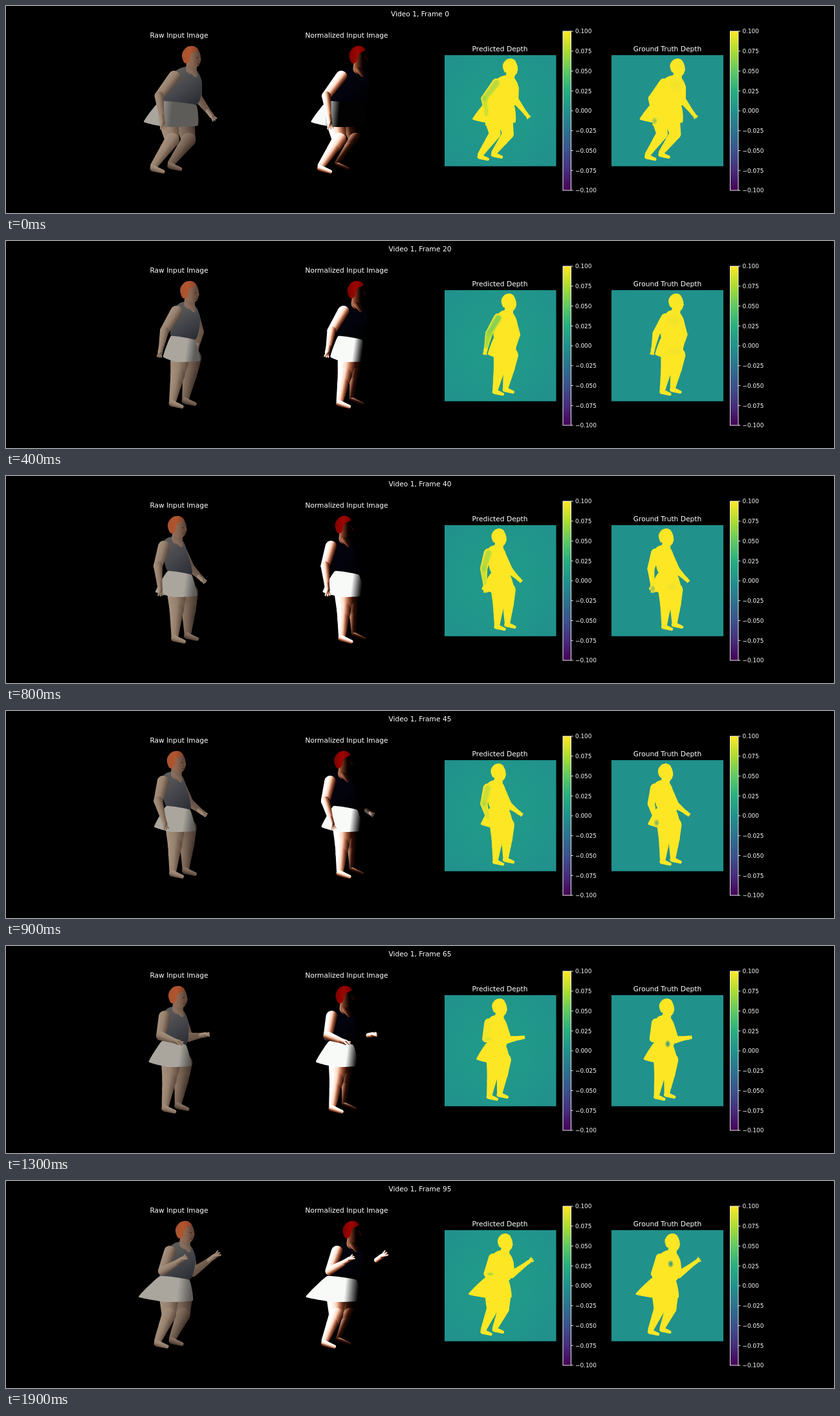
These frames come from a looping animation (1280x320 px, 2 s). An HTML page with a canvas:

```html
<!DOCTYPE html>
<html lang="en">
<head>
<meta charset="utf-8">
<title>Depth prediction</title>
<style>
html, body { margin: 0; height: 100%; overflow: hidden; background: #000; }
canvas { display: block; }
</style>
</head>
<body>
<canvas id="stage" width="1280" height="320"></canvas>
<script>
const ctx = document.getElementById('stage').getContext('2d');
const clamp = u => Math.min(1, Math.max(0, u));
const mix = (a, b, u) => [a[0] + (b[0] - a[0]) * u, a[1] + (b[1] - a[1]) * u];
const bump = (x, center, width) => Math.exp(-(((x - center) / width) ** 2));

// Key poses: step, head x, hip x, back hem x, near fingertip x y, far fingertip x y.
// The rest of the body follows from these in skeleton().
const poses = [
  [0, 286, 252, 213, 243, 190, 323, 176],
  [2, 287, 264, 241, 237, 183, 302, 178],
  [6, 277, 271, 239, 238, 178, 290, 168],
  [8, 264, 264, 231, 239, 185, 308, 164],
  [11, 264, 258, 226, 267, 172, 309, 153],
  [16, 268, 252, 212, 276, 120, 323, 112],
  [19, 276, 252, 205, 279, 117, 330, 111]];

// Cubic Hermite interpolation through the key poses.
function poseAt(step) {
  let i = 0;
  while (i < poses.length - 2 && step >= poses[i + 1][0]) i++;
  const from = poses[i], to = poses[i + 1], span = to[0] - from[0], u = (step - from[0]) / span;
  const slope = (k, c) => {
    const a = poses[Math.max(k - 1, 0)], b = poses[Math.min(k + 1, poses.length - 1)];
    return (b[c] - a[c]) / (b[0] - a[0]);
  };
  return from.map((v, c) => v + (to[c] - v) * u * u * (3 - 2 * u) +
    span * u * (1 - u) * (slope(i, c) * (1 - u) - slope(i + 1, c) * u));
}

function skeleton(step) {
  const [, head, hip, hemX, handX, handY, farX, farY] = poseAt(step);
  const lean = head - hip, crouch = Math.max(0, lean - 16) * .75;
  const shoulder = [head - 20 - crouch * .45, 109];
  const elbow = [shoulder[0] - 8 - lean * .35 + (handX - shoulder[0]) * .2, 139];
  const farElbow = [head + 20 - lean * .3, 141];
  const limb = (top, joint, tip) => [top, joint, mix(joint, tip, .62), tip];
  const legFrom = (hipX, footX, y) => {
    const ankle = [footX, y];
    return [[hipX, 181], [mix([hipX], [footX], .42)[0] + 1 + crouch, 207], ankle, [footX + 14, y + 9]];
  };
  const foot = hip - 3 - lean * .6;
  return {
    step,
    head: [head, 79],
    torso: [[head - 8, 94], [shoulder[0] - 1, 104], [hip - 14, 147],
      [hip + 23 + crouch * 1.4, 153], [head + 17, 120], [head + 9, 100]],
    hem: [[hemX, 179], [hip - 5, 187], [hip + 31 + crouch, 185]],
    near: limb(shoulder, elbow, [handX, handY]),
    far: limb([head + 8, 119], farElbow, [farX, farY]),
    nearLeg: legFrom(hip, foot, 247),
    farLeg: legFrom(hip + 18 + crouch * .5, foot + 20 + crouch * .5, 243)
  };
}

function ramp(x0, y0, x1, y1, colors) {
  if (typeof colors === 'string') return colors;
  const g = ctx.createLinearGradient(x0, y0, x1, y1);
  colors.forEach((c, i) => g.addColorStop(i / (colors.length - 1), c));
  return g;
}

// Tapered capsule, shaded across its width from the upper left.
function capsule(a, ra, b, rb, colors) {
  const angle = Math.atan2(b[1] - a[1], b[0] - a[0]);
  let nx = Math.sin(angle), ny = -Math.cos(angle);
  if (nx + ny / 2 < 0) { nx = -nx; ny = -ny; }
  const r = Math.max(ra, rb);
  ctx.fillStyle = ramp(a[0] - nx * r, a[1] - ny * r, a[0] + nx * r, a[1] + ny * r, colors);
  ctx.beginPath();
  ctx.arc(...a, ra, angle + Math.PI / 2, angle + Math.PI * 1.5);
  ctx.arc(...b, rb, angle - Math.PI / 2, angle + Math.PI / 2);
  ctx.fill();
}

// Closed curve through the given points; bend 0 gives straight sides.
function blob(pts, bend, fill) {
  const at = i => pts[(i + pts.length) % pts.length], k = bend / 6;
  ctx.beginPath();
  ctx.moveTo(...pts[0]);
  pts.forEach((p, i) => {
    const q = at(i + 1), o = at(i - 1), s = at(i + 2);
    ctx.bezierCurveTo(p[0] + (q[0] - o[0]) * k, p[1] + (q[1] - o[1]) * k,
      q[0] - (s[0] - p[0]) * k, q[1] - (s[1] - p[1]) * k, ...q);
  });
  ctx.fillStyle = fill;
  ctx.fill();
}

function hand(wrist, tip, colors) {
  const palm = mix(wrist, tip, .5), angle = Math.atan2(tip[1] - wrist[1], tip[0] - wrist[0]);
  const reach = Math.hypot(tip[0] - palm[0], tip[1] - palm[1]);
  capsule(wrist, 3.8, palm, 4, colors);
  for (const spread of [-.4, 0, .4]) {
    const end = [palm[0] + Math.cos(angle + spread) * reach, palm[1] + Math.sin(angle + spread) * reach];
    capsule(palm, 2.2, end, 1.3, colors);
  }
}

function arm([shoulder, elbow, wrist], colors) {
  capsule(shoulder, 9, elbow, 7, colors);
  capsule(elbow, 7, wrist, 4, colors);
}

function leg([hip, knee, ankle, toe], colors) {
  const calf = mix(knee, ankle, .35);
  capsule(hip, 15, knee, 11, colors);
  capsule(knee, 11, calf, 9, colors);
  capsule(calf, 9, ankle, 5.5, colors);
  capsule([ankle[0] - 1, ankle[1] + 4], 5, toe, 3, colors);
}

function drawHead([x, y], look) {
  ctx.fillStyle = ramp(x - 10, y, x + 15, y, look.face);
  ctx.beginPath();
  ctx.ellipse(x + 3, y, 12, 17, -.2, 0, 7);
  ctx.fill();
  capsule([x + 11, y - 1], 1.5, [x + 14, y + 4], 1.6, look.nose);
  const outline = [[11, -11], [4, -17], [-7, -15], [-14, -4], [-10, 9], [-3, 7], [1, -5]];
  blob(outline.map(([dx, dy]) => [x + dx, y + dy]), 1, ramp(x - 14, y, x + 12, y, look.hair));
  if (look.eye) {
    ctx.fillStyle = look.eye;
    ctx.fillRect(x + 8, y, 3.5, 1.6);
    ctx.fillRect(x + 9, y + 10, 4, 1);
  }
}

function skirtFill(cloth, [back, , front], step) {
  if (typeof cloth === 'string') return cloth;
  const lit = .85 - .45 * Math.exp(-step / 3);
  const g = ctx.createLinearGradient(...back, front[0], back[1] + 8);
  g.addColorStop(clamp(lit - .15), cloth[0]);
  g.addColorStop(clamp(lit + .1), cloth[1]);
  return g;
}

function figure(body, look) {
  const { step, head, torso, hem, near, far } = body;
  const [nape, shoulder, waistBack, waistFront, chest, throat] = torso;
  arm(far, look.farArm);
  ctx.globalAlpha = look.fadeHand ? clamp((step - 8) / 3) : 1;
  hand(far[2], far[3], look.skin);
  ctx.globalAlpha = 1;
  leg(body.farLeg, look.farSkin);
  leg(body.nearLeg, look.skin);
  blob(torso, .8, ramp(...shoulder, ...waistFront, look.dress));
  blob([waistBack, ...hem, waistFront], .3, skirtFill(look.cloth, hem, step));
  capsule([head[0] + 1, head[1] + 10], 8, mix(nape, throat, .5), 8.5, look.neck);
  const collar = mix(throat, chest, .35);
  capsule(mix(nape, throat, .6), 6.5, [collar[0] - 5, collar[1]], 3, look.neck);
  drawHead(head, look);
  arm(near, look.skin);
  hand(near[2], near[3], look.skin);
}

const rawLook = {
  skin: ['#a8927f', '#957f6d', '#594639'], farSkin: ['#8f7a69', '#705c4e', '#3f3129'],
  farArm: ['#7d6858', '#5f4c40'], face: ['#9a745e', '#85634f', '#523b31'], nose: '#694c3c',
  neck: ['#8d7263', '#64503f'], hair: ['#a8532f', '#b0552f', '#81402a'],
  dress: ['#5c5a58', '#43444a', '#2b2d34'], cloth: ['#aaa69e', '#5d5c59'], eye: '#432f26'
};
const normLook = {
  skin: ['#fff', '#fff', '#ffd8bf', '#9a4d30', '#0c0200'],
  farSkin: ['#e0a080', '#321006', '#000', '#000'], farArm: '#000',
  face: ['#dc946e', '#74321e', '#060000', '#000'], nose: '#1a0602', neck: ['#d98d66', '#260a04', '#000'],
  hair: ['#7c0200', '#a00500', '#6a0000'], dress: ['#02030c', '#02030c', '#000'],
  cloth: ['#f8faf8', '#020202'], fadeHand: true
};
const depthLook = Object.fromEntries(Object.keys(normLook).slice(0, -1).map(part => [part, '#fde725']));

function spot([x, y], r, color, alpha, stretch = 1) {
  ctx.save();
  ctx.translate(x, y);
  ctx.scale(1, stretch);
  const g = ctx.createRadialGradient(0, 0, 0, 0, 0, r);
  g.addColorStop(0, color);
  g.addColorStop(.45, color + 'aa');
  g.addColorStop(1, color + '00');
  ctx.globalAlpha = clamp(alpha);
  ctx.fillStyle = g;
  ctx.fillRect(-r, -r, 2 * r, 2 * r);
  ctx.restore();
}

function predicted(body) {
  const { step, near: [shoulder, elbow, wrist] } = body;
  figure(body, depthLook);
  ctx.save();
  ctx.filter = 'blur(1px)';
  ctx.globalAlpha = .8 * bump(step, 4, 5.5);
  capsule(shoulder, 6, elbow, 5, '#6ccd5a');
  capsule(elbow, 5, wrist, 3, '#8fd744');
  ctx.restore();
  spot([elbow[0] + 6, elbow[1] + 1], 8, '#7ad151', .8 * (step / 19) ** 3, .5);
}

function groundTruth(body) {
  const { step, head, near, hem: [, hem], torso: { 4: chest } } = body;
  const early = bump(step, 2, 1.2);
  figure(body, depthLook);
  spot(mix(near[2], near[3], .6), 6, '#21918c', 1 - bump(step, 4, 5), 1.3);
  spot([chest[0] - 20, chest[1] - 7], 17, '#25a085', early);
  spot([head[0] + 4, 76], 13, '#5ec962', early * .8);
  spot([hem[0] + 2, 177], 8, '#90d743', early);
  ctx.beginPath();
  ctx.rect(0, 0, 400, hem[1] - 8);
  ctx.clip();
  spot([hem[0] + 18, hem[1] - 10], 16, '#21918c', bump(step, 6, 1.2));
}

function label(text, x, y, size = 32 / 3, align = 'center') {
  ctx.font = `${size}px "DejaVu Sans", sans-serif`;
  ctx.textAlign = align;
  ctx.fillStyle = '#fff';
  ctx.fillText(text, x, y);
}

const viridis = ['#fde725', '#addc30', '#5ec962', '#28ae80', '#21918c', '#2c728e', '#3b528b', '#472d7b', '#440154'];
function colorbar(x) {
  ctx.fillStyle = ramp(0, 39, 0, 285, viridis);
  ctx.fillRect(x, 39, 12.5, 246);
  ctx.strokeStyle = '#fff';
  ctx.lineWidth = .9;
  ctx.strokeRect(x, 39, 12.5, 246);
  for (let i = 0; i < 9; i++) {
    const y = 39 + i * 30.75, value = (4 - i) * .025;
    ctx.beginPath();
    ctx.moveTo(x + 12.5, y);
    ctx.lineTo(x + 15.8, y);
    ctx.stroke();
    label((value < 0 ? '−' : '') + Math.abs(value).toFixed(3), x + 19, y + 3.3, 80 / 9, 'left');
  }
}

function panel(draw, scaleX, scaleY, x, y) {
  ctx.save();
  ctx.transform(scaleX, 0, 0, scaleY, x, y);
  draw();
  ctx.restore();
}

function render(step) {
  const body = skeleton(step);
  ctx.fillStyle = '#000';
  ctx.fillRect(0, 0, 1280, 320);
  label(`Video 1, Frame ${step * 5}`, 640, 15.5);
  label('Raw Input Image', 267.5, 49);
  label('Normalized Input Image', 526.5, 49);
  label('Predicted Depth', 763.5, 70);
  label('Ground Truth Depth', 1022.5, 70);

  ctx.fillStyle = '#21918c';
  ctx.fillRect(936, 76, 173, 171.7);
  ctx.fillRect(678, 76, 172.5, 171.7);
  ctx.save();
  ctx.beginPath();
  ctx.rect(678, 76, 172.5, 171.7);
  ctx.clip();
  for (const [x, y] of [[705, 165], [758, 110], [765, 200], [810, 150]])
    spot([x, y], 65, '#1fa187', .4, 1.4);
  ctx.restore();

  panel(() => figure(body, rawLook), 1, 1, 0, 0);
  panel(() => figure(body, normLook), 1, 1, 258.5, 0);
  panel(() => predicted(body), .795, .8, 551.7, 31.9);
  panel(() => groundTruth(body), .795, .8, 810.2, 31.9);
  colorbar(861);
  colorbar(1119.5);
}

function loop() {
  render(Math.floor(performance.now() / 100) % 20);
  requestAnimationFrame(loop);
}
loop();
</script>
</body>
</html>
```
